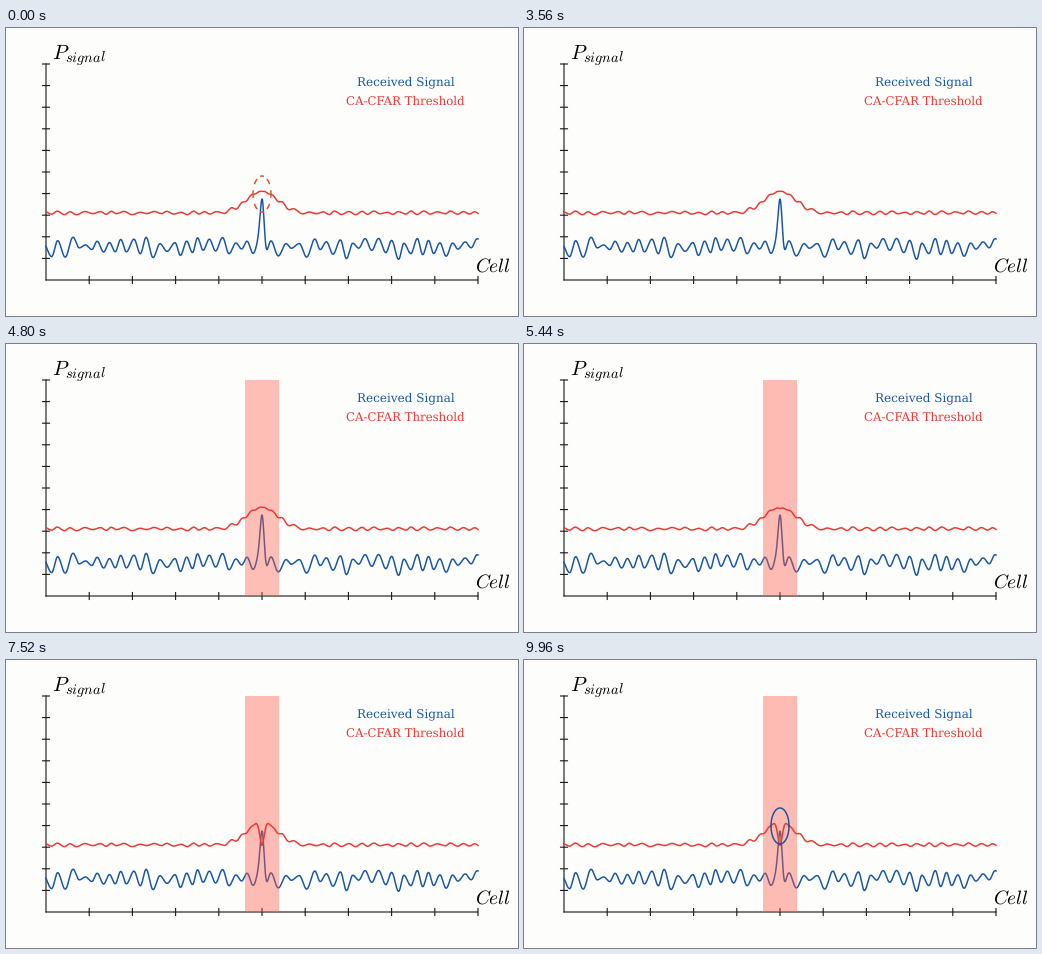
Write a matplotlib script that moves like this. It is 512x288 px and loops after 10000 ms.

```python
import numpy as np
import matplotlib.pyplot as plt
from matplotlib.animation import FuncAnimation
from matplotlib.patches import Rectangle

W, H, DPI = 512, 288, 100
PX = 72 / DPI  # points per pixel
STEP, FRAMES = 40, 250
PAPER, INK = "#fdfdfc", "#15151a"
BLUE, RED, ORANGE, PINK = "#1857a0", "#e63b35", "#e0502a", "#ff5a46"
LEFT, RIGHT, TOP, BASE = 40, 472, 36, 252
MID = 256


def ripple(rng, x, gap, peaks, troughs):
    """Random alternating peaks and troughs joined by half cosines."""
    count = int(2 * (RIGHT - LEFT) / gap)
    px = LEFT - 2 + np.cumsum(gap * rng.uniform(0.75, 1.25, count))- gap
    py = np.where(np.arange(count) % 2, rng.uniform(*troughs, count), rng.uniform(*peaks, count))
    pos = np.interp(x, px, np.arange(count))
    i = np.minimum(pos.astype(int), count - 2)
    ease = (1 - np.cos(np.pi * (pos - i))) / 2
    return py[i] + (py[i + 1] - py[i]) * ease


def bump(distance, width):
    return np.exp(-((distance / width) ** 2))


def progress(ms, start, length):
    """Sigmoid easing from 0 to 1."""
    t = np.clip((ms - start) / length, 0, 1)
    sigmoid = lambda v: 1 / (1 + np.exp(-v))
    edge = sigmoid(-5)
    return float(np.clip((sigmoid(10 * (t - 0.5)) - edge) / (1 - 2 * edge), 0, 1))


plt.rcParams.update({"mathtext.fontset": "cm", "text.hinting": "no_hinting"})
fig = plt.figure(figsize=(W / DPI, H / DPI), dpi=DPI, facecolor=PAPER)
ax = fig.add_axes([0, 0, 1, 1])
ax.set(xlim=(0, W), ylim=(H, 0))
ax.axis("off")


def stroke(x, y, color, width=1.5, z=2):
    return ax.plot(x, y, color=color, lw=width * PX, zorder=z, snap=False)[0]


def label(x, y, text, color, size, **kw):
    ax.text(x, y, text, color=color, fontsize=size * PX, va="baseline", **kw)


# Axes and text
stroke([LEFT, LEFT], [TOP, BASE], INK, 1.1)
stroke([LEFT, RIGHT], [BASE, BASE], INK, 1.1)
for k in range(1, 11):
    tick_x, tick_y = LEFT + 43.2 * k, BASE - 21.6 * k
    stroke([tick_x, tick_x], [BASE - 3.5, BASE + 3.5], INK, 1.1)
    stroke([LEFT - 3.5, LEFT + 3.5], [tick_y, tick_y], INK, 1.1)

label(46, 30.5, "$P_{signal}$", "black", 20.6)
label(469, 245, "$Cell$", "black", 19.4)
legend = dict(ha="center", family="DejaVu Serif")
label(399.5, 57.2, "Received Signal", BLUE, 12, **legend)
label(399.5, 76.8, "CA-CFAR Threshold", RED, 11.8, **legend)

# Curves
rng = np.random.default_rng(8)
xs = np.linspace(LEFT, RIGHT, 1729)
offset = np.abs(xs - MID)

noise = ripple(rng, xs, 6.6, (209, 217), (219, 232))
spike = bump(offset, 3)
stroke(xs, noise + (171 - noise) * spike, BLUE, z=3)
band = ax.add_patch(Rectangle((MID - 17.3, TOP), 34.6, BASE - TOP, fc=PINK, lw=0, zorder=4))

stepped = offset + 1.6 * np.sin(2 * np.pi * (offset - 13.5) / 10)
hump = bump(stepped, 22)
wobble = ripple(rng, xs, 6.6, (-2, -0.5), (0.5, 2))
plain = 185 - 21.7 * hump + wobble * (1 - bump(offset, 22))
notch = 22 * bump(offset, 3) - 2.5 * bump(offset - 6, 2.5)
threshold = stroke(xs, plain, RED, z=5)

# Ellipses around the peak
angle = np.linspace(0, 2 * np.pi, 721)
ring_x, ring_y = MID + 9 * np.cos(angle), 166 - 18 * np.sin(angle)
turn = angle / (2 * np.pi)
dashed = stroke(ring_x, np.where((turn * 8 + 0.27) % 1 < 0.54, ring_y, np.nan), ORANGE, z=6)
dashed.set_solid_capstyle("butt")
ring = stroke([], [], BLUE, z=6)


def draw(i):
    ms = i * STEP
    dashed.set_alpha(1 - progress(ms, 2000, 1000))
    band.set_alpha(0.4 * progress(ms, 4000, 1000))
    threshold.set_ydata(plain + notch * progress(ms, 5000, 2000))
    drawn = progress(ms, 8000, 1000)
    shown = (turn <= drawn) & (drawn > 0)
    ring.set_data(ring_x[shown], ring_y[shown])
    return dashed, band, threshold, ring


anim = FuncAnimation(fig, draw, frames=FRAMES, interval=STEP, repeat=True, repeat_delay=0)
plt.show()
```
